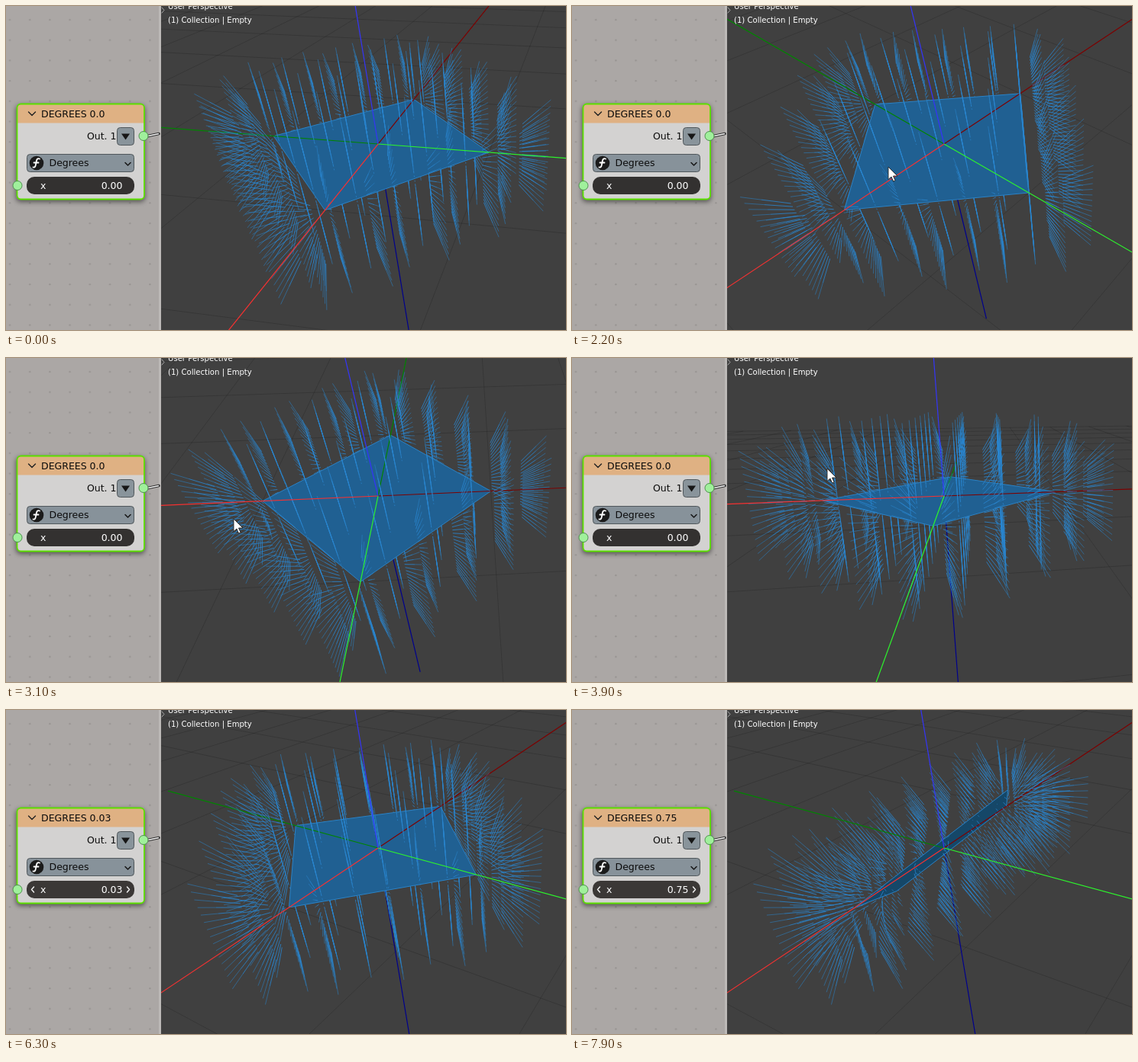
These frames come from a looping animation (733 by 425 pixels, 8 s). An HTML page with a canvas:

```html
<!DOCTYPE html>
<html>
<head>
<meta charset="utf-8">
<style>
html, body { margin: 0; width: 733px; height: 425px; overflow: hidden; background: #404040; }
canvas, svg { position: absolute; left: 0; top: 0; display: block; }
text { font-family: "DejaVu Sans", Verdana, sans-serif; font-size: 12.5px; fill: #0c0c0c; }
.view text { font-size: 10.1px; fill: #fff; }
text.light { fill: #fff; }
.end { text-anchor: end; }
.line { fill: none; stroke-linecap: round; stroke-linejoin: round; }
</style>
</head>
<body>
<canvas id="view" width="733" height="425"></canvas>
<svg width="733" height="425" viewBox="0 0 733 425">
  <defs>
    <pattern id="dots" x="-8" y="5" width="26.2" height="26.7" patternUnits="userSpaceOnUse">
      <circle cx="13" cy="13" r="1.2" fill="#979391"/>
    </pattern>
    <filter id="soft" x="-20%" y="-20%" width="140%" height="140%"><feGaussianBlur stdDeviation="3"/></filter>
  </defs>
  <rect width="200" height="425" fill="#aba7a5"/>
  <rect width="199" height="425" fill="url(#dots)"/>
  <rect x="200" width="3" height="425" fill="#bcb9b7"/>
  <g>
    <rect x="13" y="130" width="169" height="127" rx="6" fill="#000" opacity=".5" filter="url(#soft)"/>
    <rect x="15" y="129" width="166" height="124.500" rx="5" fill="#d3d2d1"/>
    <path d="M15 153.500V134a5 5 0 0 1 5-5H176a5 5 0 0 1 5 5V153.500Z" fill="#dfb183"/>
    <rect x="14.500" y="128.500" width="166.500" height="125" rx="5" fill="none" stroke="#5ce000" stroke-width="1.800"/>
    <path class="line" d="M29.500 139l4.500 4.500 4.500-4.500" stroke="#222" stroke-width="1.400"/>
    <text id="title" x="46" y="146"></text>
    <text class="end" x="144.500" y="175">Out. 1</text>
    <rect x="145.500" y="159.500" width="22" height="23" rx="4" fill="#89949b" stroke="#50575b"/>
    <path d="M151 167.500h11l-5.500 8z" fill="#161616"/>
    <path class="line" d="M186 170.500L200 167.500" stroke="#303030" stroke-width="3.500"/>
    <path d="M186 170.500L200 167.500" stroke="#f2f2f2" stroke-width="1.600"/>
    <rect x="27.500" y="194.500" width="140" height="23" rx="4" fill="#87929a" stroke="#50575b"/>
    <circle cx="40" cy="206" r="9.300" fill="#1b1b1b"/>
    <path class="line" d="M44 200.500c-3-1.500-4 1-4.500 4.500s-1 7.500-4 6.500M36.500 205.500h6" stroke="#fff" stroke-width="1.800"/>
    <text x="56.500" y="210">Degrees</text>
    <path class="line" d="M156 205.500l3.500 3.500 3.500-3.500" stroke="#161616" stroke-width="1.500"/>
    <rect id="slider" x="27" y="224" width="141" height="23" rx="10" fill="#333130"/>
    <g id="arrows">
      <path class="line" d="M36.500 232l-3 3.500 3 3.500M158.500 232l3 3.500-3 3.500" stroke="#eee" stroke-width="1.500"/>
    </g>
    <text class="light" x="45" y="240">x</text>
    <text id="value" class="light end" x="152.500" y="240"></text>
    <g fill="#a0f09c" stroke="#4f8f4f" stroke-width="1">
      <circle cx="180" cy="170.500" r="6"/>
      <circle cx="15" cy="235.500" r="6"/>
    </g>
  </g>
  <g class="view">
    <path class="line" d="M204 2l3 3.500-3 3.500" stroke="#aaa"/>
    <text x="212" y="4">User Perspective</text>
    <text x="212" y="22">(1) Collection | Empty</text>
  </g>
  <path id="pointer" d="M0 0V16.500L4 13l2.600 6 2.500-1.100L6.500 12H12Z" fill="#fff" stroke="#222" stroke-width=".9"/>
</svg>
<script>
const LOOP = 8000, STEP = 100;
const FOCAL = 635, CX = 660, CY = 220, DIST = 4.3;
const ORIGIN = [487, 181];
const REACH = 0.7, HEIGHT = 0.69, LAYERS = 24;
const ROOT = 0.55; // share of the way out at which a hair begins

// time, azimuth, elevation, drawn length of the -y axis
const VIEW = [
  [1300, 8.7, 32.1, 3], [2200, 37.4, 43.2, 4.4], [3100, 86, 42.8, 3],
  [3900, 79.5, 15.7, 2.1], [4800, 27.3, 31.7, 2.95], [5000, 26.4, 32.5, 2.95]
];
// time, x, y
const POINTER = [
  [600, 650, 96], [1200, 494, 185], [1300, 480, 185], [2200, 414, 211], [3100, 298, 211],
  [3900, 334, 145], [4800, 447, 184], [5000, 450, 186]
];
const TO_SLIDER = [[5300, 413, 195], [6200, 133, 222]];
const ANGLE = [[6900, 0.03], [7900, 0.75]];

const $ = id => document.getElementById(id);
const ctx = $('view').getContext('2d');

function sample(keys, t) {
  if (t <= keys[0][0]) return keys[0].slice(1);
  for (let i = 1; i < keys.length; i++) {
    const a = keys[i - 1], b = keys[i];
    if (t <= b[0]) {
      const k = (t - a[0]) / (b[0] - a[0]);
      return a.slice(1).map((v, j) => v + (b[j + 1] - v) * k);
    }
  }
  return keys[keys.length - 1].slice(1);
}

function makeCamera(az, el) {
  const r = Math.PI / 180;
  const sa = Math.sin(az * r), ca = Math.cos(az * r);
  const se = Math.sin(el * r), ce = Math.cos(el * r);
  const right = (ORIGIN[0] - CX) / FOCAL * DIST, up = (CY - ORIGIN[1]) / FOCAL * DIST;
  return ([x, y, z]) => {
    const g = -x * ca - y * sa;
    return [right - x * sa + y * ca, up + g * se + z * ce, DIST + g * ce - z * se];
  };
}

const flat = ([x, y, z]) => [CX + FOCAL * x / z, CY - FOCAL * y / z];
const mix = (a, b, k) => a.map((v, i) => v + (b[i] - v) * k);

function addLine(cam, p, q) {
  const near = 0.2;
  let a = cam(p), b = cam(q);
  if (a[2] < near && b[2] < near) return;
  if (a[2] < near) a = mix(a, b, (near - a[2]) / (b[2] - a[2]));
  if (b[2] < near) b = mix(b, a, (near - b[2]) / (a[2] - b[2]));
  ctx.moveTo(...flat(a));
  ctx.lineTo(...flat(b));
}

function strokeLines(cam, lines, color, width = 1) {
  ctx.beginPath();
  for (const [p, q] of lines) addLine(cam, p, q);
  ctx.strokeStyle = color;
  ctx.lineWidth = width;
  ctx.stroke();
}

function turnX([x, y, z], c, s) {
  return [x, y * c - z * s, y * s + z * c];
}

// nearest point of the square |x| + |y| <= 1 in its own plane
function nearest(x, y) {
  const ax = Math.abs(x), ay = Math.abs(y);
  if (ax + ay <= 1) return [x, y, 0];
  const k = Math.min(1, Math.max(0, (ax - ay + 1) / 2));
  return [k * Math.sign(x), (1 - k) * Math.sign(y), 0];
}

// short lines that end on a fixed lattice and point away from the tilted square
function makeHairs(angle) {
  const c = Math.cos(angle), s = Math.sin(angle);
  const sides = { '1': [], '-1': [] };
  for (let i = 0; i < 10; i++) for (let j = 0; j < 10; j++) for (let k = 0; k < LAYERS; k++) {
    const p = [-1.5 + i / 3, -1.5 + j / 3, HEIGHT * (2 * k / (LAYERS - 1) - 1)];
    const l = turnX(p, c, -s), n = nearest(l[0], l[1]);
    if (Math.hypot(l[0] - n[0], l[1] - n[1], l[2]) > REACH) continue;
    sides[l[2] > 0 ? 1 : -1].push([mix(turnX(n, c, s), p, ROOT), p]);
  }
  return sides;
}

function strokeHairs(cam, hairs) {
  strokeLines(cam, hairs.map(([p, q]) => [mix(p, q, 0.6), q]), 'rgba(42,132,204,.6)', 0.9);
  strokeLines(cam, hairs.map(([p, q]) => [p, mix(p, q, 0.6)]), 'rgba(42,134,208,.9)', 0.9);
}

const grid = [];
for (let i = -8; i <= 8; i++) {
  if (i) grid.push([[i, -8, 0], [i, 8, 0]], [[-8, i, 0], [8, i, 0]]);
}

function drawView(az, el, negY, angle) {
  const cam = makeCamera(az, el);
  const c = Math.cos(angle), s = Math.sin(angle);
  const axis = (end, color) => strokeLines(cam, [[[0, 0, 0], end]], color, 1.2);
  ctx.fillStyle = '#404040';
  ctx.fillRect(203, 0, 530, 425);
  ctx.save();
  ctx.beginPath();
  ctx.rect(203, 0, 530, 425);
  ctx.clip();

  strokeLines(cam, grid, 'rgba(0,0,0,.16)');
  axis([0, 0, -2.96], '#00008c');

  const corners = [[0, -1, 0], [-1, 0, 0], [0, 1, 0], [1, 0, 0]]
    .map(p => flat(cam(turnX(p, c, s))));
  const area = corners.reduce((sum, p, i) => {
    const q = corners[(i + 1) % 4];
    return sum + p[0] * q[1] - q[0] * p[1];
  }, 0);
  const front = area > 0 ? 1 : -1;
  const hairs = makeHairs(angle);

  strokeHairs(cam, hairs[-front]);
  ctx.beginPath();
  corners.forEach(p => ctx.lineTo(...p));
  ctx.closePath();
  ctx.fillStyle = front > 0 ? '#206092' : '#154768';
  ctx.fill();
  ctx.strokeStyle = '#2a82c6';
  ctx.lineWidth = 1;
  ctx.stroke();

  axis([-9, 0, 0], '#7c0000');
  axis([0, -negY, 0], '#008400');
  strokeHairs(cam, hairs[front]);
  axis([9, 0, 0], '#f83030');
  axis([0, 9, 0], '#2cf42c');
  axis([0, 0, 4], '#3434f8');
  ctx.restore();
}

function placePointer(t) {
  const drag = t >= 100 && t < 5000, travel = t >= 5400 && t < 6300;
  $('pointer').style.display = drag || travel ? '' : 'none';
  const [x, y] = sample(travel ? TO_SLIDER : POINTER, t);
  $('pointer').setAttribute('transform', `translate(${x} ${y})`);
}

function render(t) {
  const value = t < 6300 ? 0 : sample(ANGLE, t)[0];
  $('title').textContent = 'DEGREES ' + (value ? value.toFixed(2) : '0.0');
  $('value').textContent = value.toFixed(2);
  $('arrows').style.display = t >= 6200 ? '' : 'none';
  $('slider').setAttribute('fill', t >= 6200 ? '#3b3836' : '#333130');
  drawView(...sample(VIEW, t), t < 7000 ? 0 : value);
  placePointer(t);
}

const start = performance.now();
let shown = -1;
function tick() {
  const t = Math.floor((performance.now() - start) % LOOP / STEP) * STEP;
  if (t !== shown) render(shown = t);
  requestAnimationFrame(tick);
}
tick();
</script>
</body>
</html>
```
